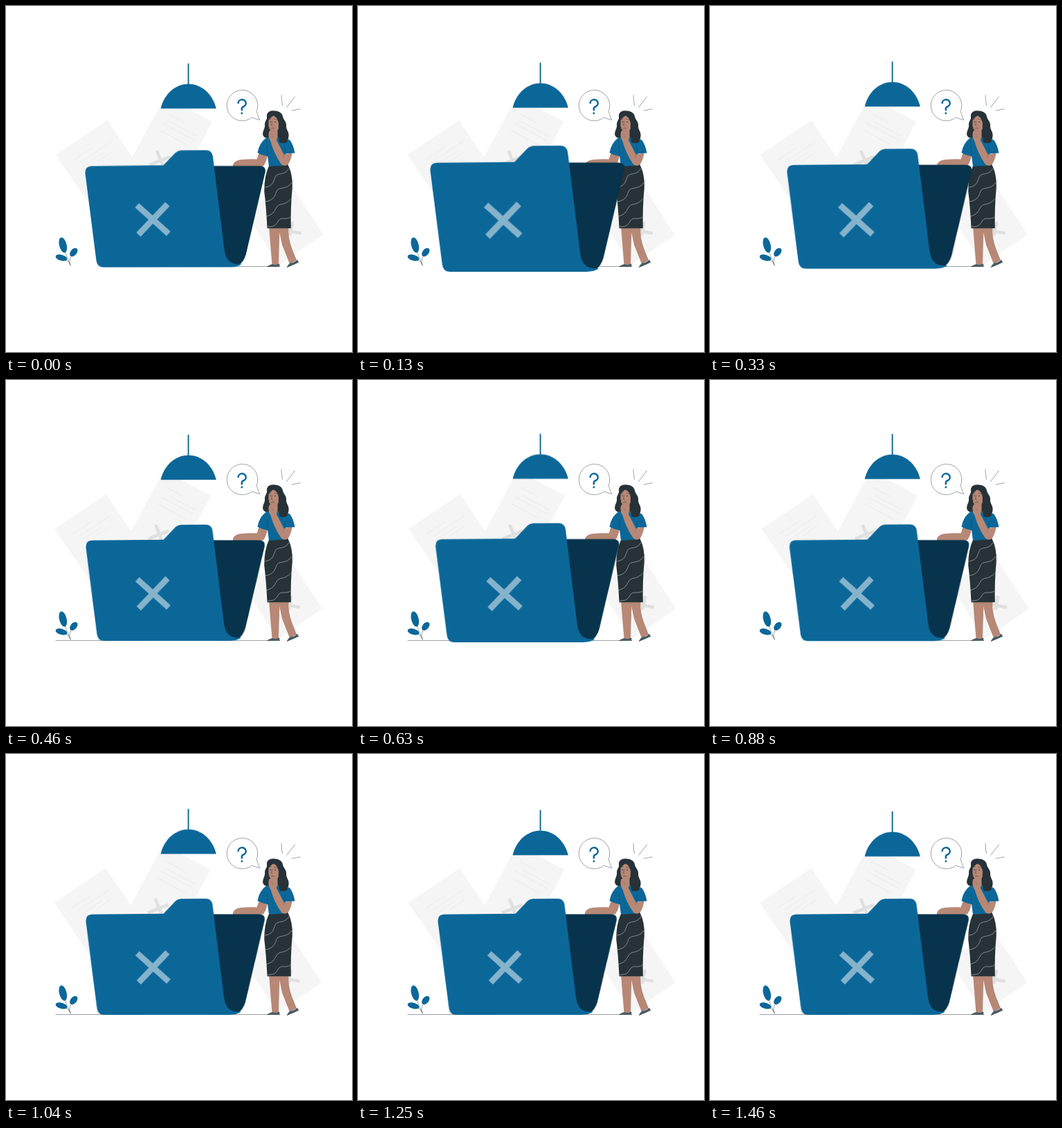
These frames come from a looping animation (500 by 500 pixels, 1.5 s). An HTML page:

```html
<!DOCTYPE html>
<html lang="en">
<head>
<meta charset="utf-8">
<title>Empty folder</title>
<style>
  html, body { margin: 0; width: 100%; height: 100%; overflow: hidden; background: #fff; }
  svg { display: block; width: 100vw; height: 100vh; }

  .folder, .lamp, .papers, .floor {
    animation: 1.5s linear -12ms infinite;
  }
  .folder { animation-name: beat; transform-origin: 244.5px 293px; }
  .lamp { animation-name: float; }
  .papers { animation-name: shake; }
  .floor { animation-name: blink; animation-timing-function: step-end; }

  @keyframes beat {
    0%, 30%, 40%, 60%, 100% { transform: scale(1); }
    10%, 50% { transform: scale(1.09); }
  }
  @keyframes float {
    0%, 100% { transform: translateY(0); }
    50% { transform: translateY(-6.4px); }
  }
  @keyframes shake {
    0%, 100% { transform: translateX(0); }
    10%, 90% { transform: translateX(-.64px); }
    20%, 80% { transform: translateX(1.28px); }
    30%, 50%, 70% { transform: translateX(-2.56px); }
    40%, 60% { transform: translateX(2.56px); }
  }
  @keyframes blink {
    0%, 30%, 61.3%, 100% { opacity: 1; }
    .8%, 48% { opacity: 0; }
  }

  .blue { fill: #0c6799; }
  .navy { fill: #07334c; }
  .ink { fill: #263238; }
  .skin { fill: #b78876; }
  .shoe { fill: #455a64; }
  .sheet { fill: #f5f5f5; }
  .line { fill: none; stroke: #263238; stroke-width: .45; stroke-linecap: round; }
  .rule { fill: none; stroke: #e4e4e4; stroke-width: .6; }
  .mark { fill: none; stroke: #e0e0e0; stroke-width: 4.6; }
  .wave { fill: none; stroke: #dfe3e5; stroke-width: .5; }
  .crease { fill: none; stroke: #084a6f; stroke-width: .6; }
</style>
</head>
<body>
<svg viewBox="0 0 500 500">
  <g class="papers">
    <g>
      <path class="sheet" d="M72 215 146.500 165 216 268 142 318Z"/>
      <path class="rule" d="M98 222 125 205M107 226 152 196M111 232 141 212M132 225 153 211"/>
    </g>
    <g>
      <path class="sheet" d="M229.500 131 298 167 248 261 170 242Z"/>
      <path class="rule" d="M233 155 258 168M236 167 276 188M226 169 273 194M221 179 262 201"/>
      <path class="mark" d="M218 209 228 234M207.500 229.500 237 218"/>
    </g>
    <g>
      <path class="sheet" d="M414 262 458.500 330.500 395 374 342 293Z"/>
      <path class="mark" d="M426.500 328.500 400 323.500M414 312 410 332"/>
    </g>
  </g>

  <path class="line floor" d="M72 376.500H200"/>
  <path class="line" d="M300 376.500H396"/>

  <g class="lamp">
    <path class="blue" d="M262.600 83.200h1.900v31h-1.900z"/>
    <path class="blue" d="M223.600 148.200C229 125.500 246 112.800 263.600 112.800S298 125.500 303.800 148.200Z"/>
  </g>

  <g class="plant">
    <path class="line" d="M83 350Q88 364 93.500 375M97 358Q90 365 92.500 373M83 365Q90 367 93.500 375"/>
    <ellipse class="blue" cx="82.300" cy="345.500" rx="5.300" ry="11.300" transform="rotate(-14 82.300 345.500)"/>
    <ellipse class="blue" cx="97.800" cy="355.800" rx="4.500" ry="7" transform="rotate(40 97.800 355.800)"/>
    <ellipse class="blue" cx="80" cy="363.800" rx="8.600" ry="4.200" transform="rotate(16 80 363.800)"/>
  </g>

  <g class="thought">
    <path class="line" d="M355 161.500A22.300 22.300 0 1 1 362 152.500L366.500 164.500Z"/>
    <path d="M335.700 141.200A5.500 5.300 0 1 1 343.500 145.300Q340.800 146.200 340.800 148.500V151.300" fill="none" stroke="#0c6799" stroke-width="2.500"/>
    <circle class="blue" cx="340.800" cy="155" r="1.400"/>
    <path class="line" d="M398 129Q398 137 399.500 143.500M417.500 131 405.500 146.500M413 151 425 148.800"/>
  </g>

  <g class="woman">
    <path class="skin" d="M380 319H395.500L394.500 354 394 374H384.500L382.500 350Z"/>
    <path class="skin" d="M393.500 319H408.500Q407 333 413 350L420 367.500 410 373 399 345Z"/>
    <path class="shoe" d="M376 377Q380 374.500 384.500 373Q390 375 395.300 372.500V376.800Z"/>
    <path class="shoe" d="M405.300 378.300Q407 374 410.500 371.500Q416 371.500 421 366.800L423.200 370.500Q415 374.500 405.300 378.300Z"/>

    <path class="ink" d="M380 231 407.500 229.500Q414.500 243 413.800 262Q411 292 411.800 321.300H377.500Q376 290 373.200 268Q373 246 380 231Z"/>
    <path class="wave" d="M374.500 262C386 260 386 254 389 247S402 246 409 235M374 283C386 281 388 276 391 268S405 267 413 255M376 304C386 301 387 298 391 291S403 289 411.500 279M378 319C389 319 390 316 394 310S404 310 411 305"/>

    <path class="skin" d="M366 211 378 214Q377 224 372.500 230.500Q370 233 362 232H327.500Q328 224 338 222.200Q352 221 362.500 221.500Z"/>
    <path class="ink" d="M377 160C376 154 382 150.500 388 151.500C394 151 399.500 155 400 160C401 165 405.500 167 405 173C404.500 179 409.500 182 408.500 188C408 194 405 199 399 198C393 199 386 193 381 190C375 193 369.500 188 371.500 182C372.500 178 374.500 176 374 171C374 166 377.500 165 377 160Z"/>
    <path class="blue" d="M377 190Q386 192 395 190Q405 190 410.500 194Q415 200 417.500 212.500L404 213.500 407.500 230 380 232 378 217Q370 216 363.500 212Q366 197 377 190Z"/>
    <path class="skin" d="M381 180H392.500V190Q388 198 381.500 190Z"/>
    <path class="skin" d="M379.500 164Q382 159 387 158Q394 160 394.500 166V174Q393 183 386.500 182.500Q380.500 181 379.500 173Z"/>
    <path class="ink" d="M378.500 167Q378 157 386 155Q394 155 397 166L395 180Q393 175 394 170Q393 162 387 158.500Q382 160 378.500 167Z"/>
    <path class="ink" d="M394 178C398 184 393 190 395 197Q402 200 407 196L405 180Z"/>
    <path class="line" d="M380.500 163.700 383.300 162.800M387.800 163.500Q390 163 391.500 164.500M384.600 167 383.300 172.300 385 172.600M383.300 176.600Q386 175.500 388 177"/>
    <circle class="ink" cx="382.300" cy="167.200" r=".8"/>
    <circle class="ink" cx="389" cy="167.500" r=".8"/>
    <path class="skin" d="M379.500 184Q380.300 180 382 180.500L384 185 386.500 179.500Q388.500 179 388.500 182L391 184Q391.500 190 391 194L401.500 214.500 413.500 212.500Q412 223 407.500 229Q403 232.500 398 229Q387.500 214 382.500 196Q379 191 379.500 184Z"/>
    <path class="line" stroke-opacity=".5" d="M384 185 385.500 189M401.500 214.500 400.500 219"/>
    <path class="crease" d="M378 217Q378.500 207 377 201M404 213Q403 207 403.500 203"/>
  </g>

  <g class="folder">
    <path class="navy" d="M298 231.500H365.500Q375.300 231.500 373.500 241L346 358Q342.500 370 335.500 373.500H308Z"/>
    <path class="blue" d="M124.500 231.800 227.500 230.700 244.500 213Q248.500 209.200 254 209.200L288.500 209Q297.300 209 298.500 218L315 352Q317.500 372.300 334 372.300H340Q334 376.800 323 376.800L142.500 377Q132.700 377 131.400 367.500L115.500 242.500Q114.700 232 124.500 231.800Z"/>
    <path d="M189.700 288 235 328.800M233.400 286.500 191.800 330" fill="none" stroke="#86b3cc" stroke-width="8.600"/>
  </g>
</svg>
</body>
</html>
```
